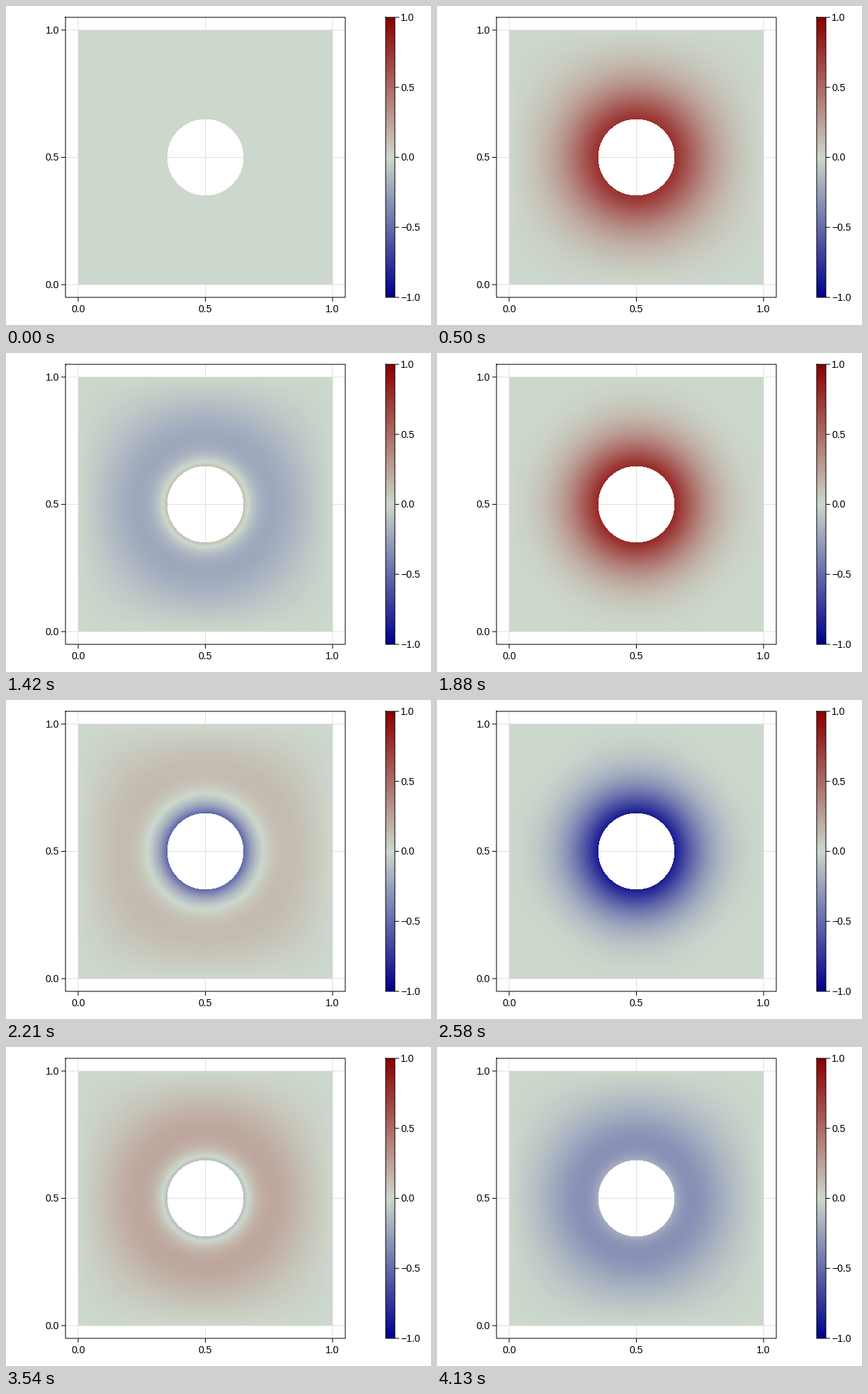
A matplotlib script that plays this animation: 600 by 450 pixels, repeating every 4170 ms.

```python
import numpy as np
import matplotlib.pyplot as plt
from matplotlib.animation import FuncAnimation
from matplotlib.colors import LinearSegmentedColormap

FRAMES, LOOP_MS = 100, 4170
CYCLES, DIFFUSIVITY, SUBSTEPS = 3, 0.2, 4
HOLE = 0.15                      # radius of the driven inner boundary
NS, NT = 48, 9                   # radial and angular nodes in one octant
LEFT, RIGHT, TOP, BOTTOM = 84, 479, 16, 411
SCALE = (RIGHT - LEFT) / 1.1     # pixels per data unit
PX = 0.72                        # points per pixel at 100 dpi


def sx(x):
    return LEFT + (x + 0.05) * SCALE


def sy(y):
    return BOTTOM - (y + 0.05) * SCALE


def build_mesh():
    """Octant between the hole and the square edge, split into triangles."""
    s, th = np.meshgrid(np.linspace(0, 1, NS), np.linspace(0, np.pi / 4, NT),
                        indexing="ij")
    r = HOLE + s * (0.5 / np.cos(th) - HOLE)
    pts = np.stack([r * np.cos(th), r * np.sin(th)], -1).reshape(-1, 2)
    ids = np.arange(NS * NT).reshape(NS, NT)
    a, b = ids[:-1, :-1].ravel(), ids[1:, :-1].ravel()
    c, d = ids[1:, 1:].ravel(), ids[:-1, 1:].ravel()
    return pts, np.vstack([np.c_[a, b, c], np.c_[a, c, d]])


def assemble(pts, tris):
    """Mass and stiffness matrices for linear elements."""
    p = pts[tris]
    edge = np.roll(p, -2, 1) - np.roll(p, -1, 1)
    u, v = p[:, 1] - p[:, 0], p[:, 2] - p[:, 0]
    area = np.abs(u[:, 0] * v[:, 1] - u[:, 1] * v[:, 0]) / 2
    area = area[:, None, None]
    k_loc = np.einsum("tik,tjk->tij", edge, edge) / (4 * area)
    m_loc = area / 12 * (np.ones((3, 3)) + np.eye(3))
    rows, cols = tris[:, :, None], tris[:, None, :]
    mass = np.zeros((len(pts), len(pts)))
    stiff = np.zeros_like(mass)
    np.add.at(mass, (rows, cols), m_loc)
    np.add.at(stiff, (rows, cols), k_loc)
    return mass, stiff


def solve():
    """Heat equation: sine on the hole, zero on the square, zero at start."""
    mass, stiff = assemble(*build_mesh())
    dt = 1 / (FRAMES * SUBSTEPS)
    new = mass + dt / 2 * DIFFUSIVITY * stiff
    old = mass - dt / 2 * DIFFUSIVITY * stiff
    rim, free = slice(0, NT), slice(NT, (NS - 1) * NT)
    inv = np.linalg.inv(new[free, free])
    step = inv @ old[free, free]
    rim_old = inv @ old[free, rim].sum(1)
    rim_new = inv @ new[free, rim].sum(1)
    drive = np.sin(2 * np.pi * CYCLES * dt * np.arange(FRAMES * SUBSTEPS + 1))

    fields = np.zeros((FRAMES, NS * NT))
    u = np.zeros(len(inv))
    for i in range(FRAMES * SUBSTEPS):
        if i % SUBSTEPS == 0:
            fields[i // SUBSTEPS, rim] = drive[i]
            fields[i // SUBSTEPS, free] = u
        u = step @ u + rim_old * drive[i] - rim_new * drive[i + 1]
    return fields


def pixel_lookup(x0, x1, y0, y1):
    """Mesh nodes and bilinear weights for each pixel, plus the hole mask."""
    x = (np.arange(x0, x1) + 0.5 - sx(0.5)) / SCALE
    y = (np.arange(y0, y1) + 0.5 - sy(0.5)) / SCALE
    x, y = np.meshgrid(np.abs(x), np.abs(y))
    r = np.hypot(x, y)
    th = np.arctan2(np.minimum(x, y), np.maximum(x, y))
    s = (r - HOLE) / (0.5 / np.cos(th) - HOLE)
    s = np.clip(s, 0, 1) * (NS - 1)
    t = th / (np.pi / 4) * (NT - 1)
    i = np.minimum(s.astype(int), NS - 2)
    j = np.minimum(t.astype(int), NT - 2)
    f, g = s - i, t - j
    n = i * NT + j
    corners = [(n, (1 - f) * (1 - g)), (n + NT, f * (1 - g)),
               (n + 1, (1 - f) * g), (n + NT + 1, f * g)]
    return corners, r < HOLE


fields = solve()
BOX = (102, 461, 34, 393)
corners, hole = pixel_lookup(*BOX)


def picture(n):
    values = sum(w * fields[n][k] for k, w in corners)
    return np.ma.array(values, mask=hole)


cmap = LinearSegmentedColormap.from_list(
    "heat", [(0, 0, 139 / 255), (205 / 255, 216 / 255, 204 / 255),
             (139 / 255, 0, 0)], N=511)

plt.rcParams["font.family"] = "Liberation Sans"
fig = plt.figure(figsize=(6, 4.5), dpi=100, facecolor="white")
ax = fig.add_axes([0, 0, 1, 1])
ax.axis("off")


def line(x, y, color="black", z=4):
    ax.plot(x, y, color=color, lw=PX, zorder=z, snap=False,
            solid_capstyle="butt")


def frame(x0, x1, y0, y1):
    ax.plot([x0, x1, x1, x0, x0], [y0, y0, y1, y1, y0], color="black", lw=PX,
            zorder=4, snap=False, solid_joinstyle="miter",
            solid_capstyle="projecting")


def label(x, y, value, ha):
    text = f"{value:.1f}".replace("-", "\u2212")
    ax.text(x, y + 5, text, ha=ha, va="baseline", fontsize=14 * PX,
            color="black")


for v in (0.0, 0.5, 1.0):
    x, y = sx(v), sy(v)
    line([x, x], [TOP, BOTTOM], "#e0e0e0", 1)
    line([LEFT, RIGHT], [y, y], "#e0e0e0", 1)
    line([x, x], [BOTTOM, BOTTOM + 6])
    line([LEFT - 6, LEFT], [y, y])
    label(x, 427, v, "center")
    label(75, y, v, "right")
frame(LEFT, RIGHT, TOP, BOTTOM)

BAR = (536, 549)
ax.imshow(np.linspace(1, -1, BOTTOM - TOP)[:, None], cmap=cmap, vmin=-1,
          vmax=1, extent=(*BAR, BOTTOM, TOP), aspect="auto",
          interpolation="nearest", zorder=2)
frame(*BAR, TOP, BOTTOM)
for v in (-1.0, -0.5, 0.0, 0.5, 1.0):
    y = (TOP + BOTTOM) / 2 - v * (BOTTOM - TOP) / 2
    line([BAR[1], BAR[1] + 6], [y, y])
    label(557, y, v, "left")

heat = ax.imshow(picture(0), cmap=cmap, vmin=-1, vmax=1,
                 extent=(BOX[0], BOX[1], BOX[3], BOX[2]), aspect="auto",
                 interpolation="nearest", zorder=2)
ax.set_xlim(0, 600)
ax.set_ylim(450, 0)


def update(n):
    heat.set_data(picture(n))
    return [heat]


anim = FuncAnimation(fig, update, frames=FRAMES, interval=LOOP_MS / FRAMES,
                     repeat=True, repeat_delay=0)
plt.show()
```
